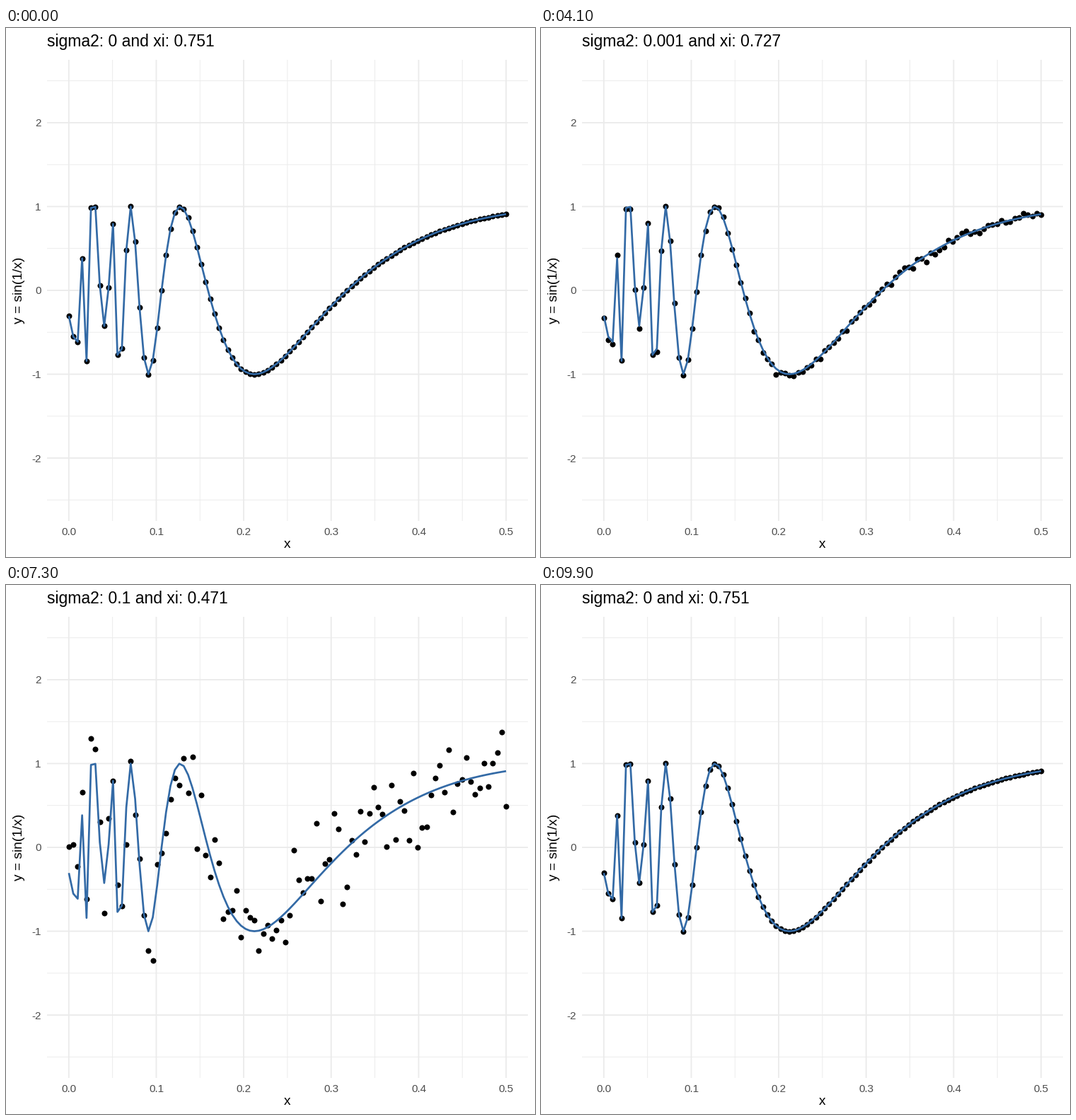
A matplotlib script for the animation above (10 s loop, 748 by 748 pixels).

```python
import numpy as np
import matplotlib.pyplot as plt
from matplotlib.animation import FuncAnimation

SIZE, DPI = 748, 100
LEFT, RIGHT, TOP, BOTTOM = 58, 738, 45, 697
PX = 72 / DPI  # points per pixel
N, STATES, FRAMES = 100, 13, 100
GRID, BLUE, TICK = "#EBEBEB", "#336AA6", "#4D4D4D"

plt.rcParams["font.family"] = "Liberation Sans"

# sin(1/x) with noise whose variance grows by sqrt(10) from state to state
x = np.linspace(0.0001, 0.5, N)
curve = np.sin(1 / x)
sigma2 = 10 ** ((np.arange(STATES) - 11) / 2)
sigma2[0] = 0
xi = np.interp(range(STATES), [0, 4, 5, 7, 9, 11, 12],
               [0.751, 0.744, 0.727, 0.69, 0.471, 0.051, 0.024])

rng = np.random.default_rng(7)
states = curve + np.sqrt(sigma2)[:, None] * rng.standard_normal((STATES, N))

# Moving frames per transition, each followed by one still frame
steps = [7] * 6 + [6] + [7] * 3 + [6] * 3
starts = np.cumsum([0] + [n + 1 for n in steps[:-1]])


def position(frame):
    """Return the state being left and the fraction moved to the next."""
    k = np.searchsorted(starts, frame, side="right") - 1
    if frame > starts[k]:
        return k, min((frame - starts[k]) / steps[k], 1)
    return k, 0


fig = plt.figure(figsize=(SIZE / DPI, SIZE / DPI), dpi=DPI, facecolor="white")
ax = fig.add_axes([LEFT / SIZE, 1 - BOTTOM / SIZE,
                   (RIGHT - LEFT) / SIZE, (BOTTOM - TOP) / SIZE])
pad = 0.05 * (x[-1] - x[0])
ax.set_xlim(x[0] - pad, x[-1] + pad)
ax.set_ylim(-2.75, 2.75)
ax.axis("off")


def label(px, py, text, size, **kw):
    kw = {"ha": "center", "va": "baseline", "color": "black", **kw}
    return fig.text(px / SIZE, 1 - py / SIZE, text, fontsize=size * PX, **kw)


def grid(xs, ys, width):
    style = dict(color=GRID, lw=width * PX, zorder=0, snap=False)
    for v in xs:
        ax.axvline(v, **style)
    for v in ys:
        ax.axhline(v, **style)


grid(np.arange(0.05, 0.5, 0.1), np.arange(-2.5, 3), 0.93)
grid(np.arange(6) / 10, range(-2, 3), 1.85)

for i in range(6):
    label(88.8 + 123.66 * i, 717, f"{i / 10:.1f}", 15.3, color=TICK)
for v in range(-2, 3):
    label(49.5, 376.5 - 118.55 * v, str(v), 15.3, ha="right", color=TICK)
label(398, 735, "x", 19.1)
label(23.5, 371, "y = sin(1/x)", 19.1, rotation=90, rotation_mode="anchor")
title = label(58, 26, "", 22.9, ha="left")

dots, = ax.plot(x, curve, "o", color="black", ms=8 * PX, mew=0, zorder=2)
ax.plot(x, curve, color=BLUE, lw=2.7 * PX, zorder=3,
        solid_capstyle="butt", solid_joinstyle="round")


def draw(frame):
    k, t = position(frame)
    after = (k + 1) % STATES
    dots.set_ydata((1 - t) * states[k] + t * states[after])
    near = after if t >= 0.5 else k
    title.set_text(f"sigma2: {round(sigma2[near], 3):g}"
                   f" and xi: {round(xi[near], 3):g}")
    return dots, title


anim = FuncAnimation(fig, draw, frames=FRAMES, interval=100,
                     repeat=True, repeat_delay=0)
plt.show()
```
